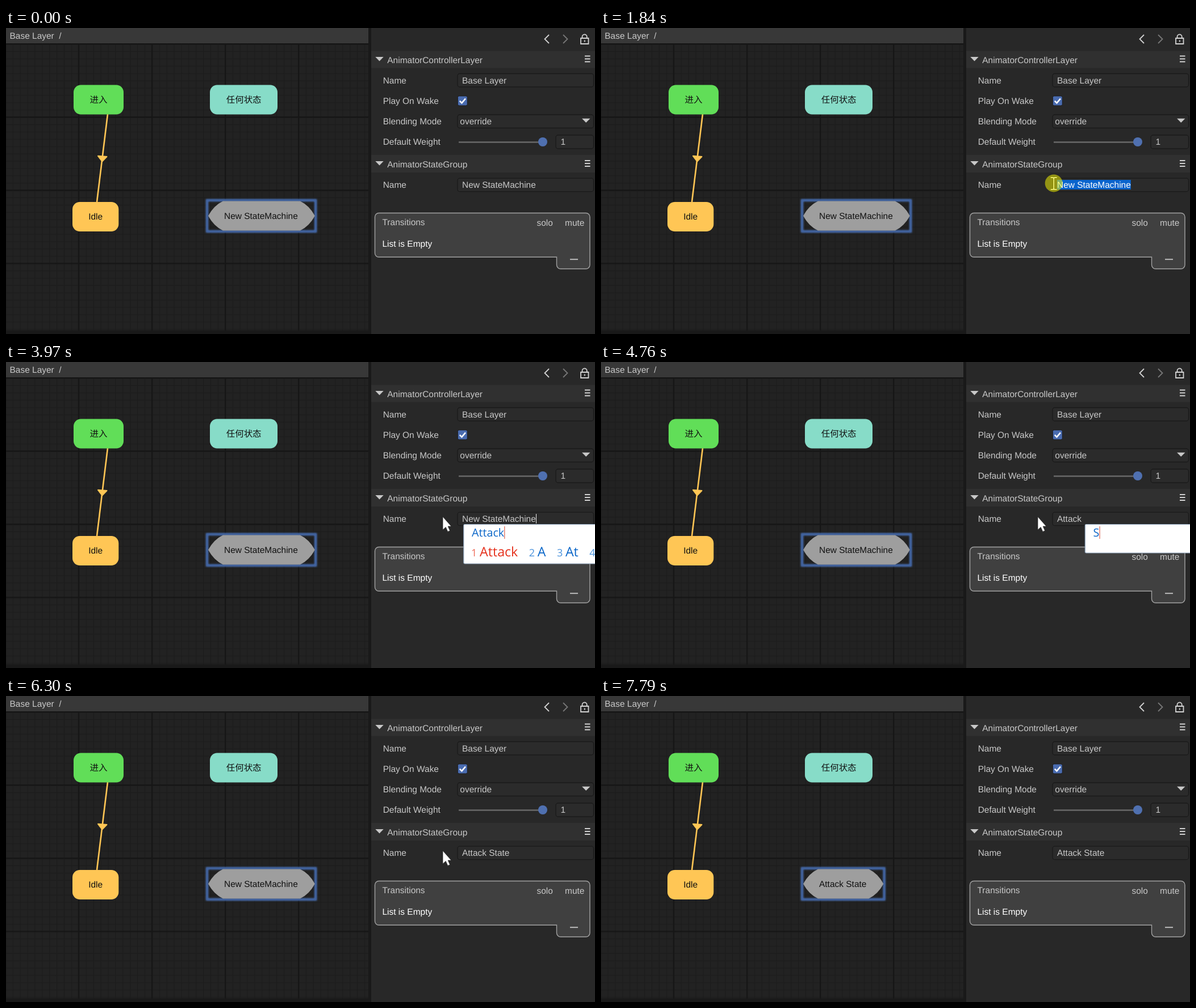
Animation, 1037 px wide and 540 px high, one loop 8930 ms. Source, as an HTML page:

```html
<!DOCTYPE html>
<html lang="en">
<head>
<meta charset="utf-8">
<title>Renaming a state group</title>
<style>
  html, body { margin: 0; width: 100%; height: 100%; overflow: hidden; background: #282828; }
  svg { display: block; width: 1037px; height: 540px; }
  text { font: 15.48px "Liberation Sans", Arial, sans-serif; fill: #c8c8c8; white-space: pre; text-rendering: geometricPrecision; }
  .dark { fill: #111; }
  .cjk { font-family: "Noto Sans CJK SC", "Noto Sans CJK", sans-serif; }
  .white { fill: #fff; }
  .box { fill: #2b2b2b; stroke: #1a1a1a; stroke-width: 1.3; }
  .icon { fill: none; stroke: #d2d2d2; stroke-width: 1.8; }
  .tri { fill: #c8c8c8; }
  #popup text { font-family: "Open Sans", "Noto Sans", sans-serif; fill: #0a66c8; }
  #typed { font-size: 19.7px; }
  #options { font-size: 23.2px; }
  #options .num { font-size: 18px; fill: #4b93dc; }
  #options .first { fill: #e5301c; }
  #options .num.first { fill: #ee6a58; }
</style>
</head>
<body>
<svg viewBox="0 0 1037 540" xmlns="http://www.w3.org/2000/svg">
  <defs>
    <pattern id="minor" x="-1.3" y="28" width="12.9" height="12.9" patternUnits="userSpaceOnUse">
      <path d="M0 .65H12.9M.65 0V12.9" stroke="#1c1c1c" stroke-width="1.3"/>
    </pattern>
    <pattern id="major" x="-2.3" y="27" width="129.1" height="129.1" patternUnits="userSpaceOnUse">
      <path d="M0 1.2H129.1M1.2 0V129.1" stroke="#161616" stroke-width="2.4"/>
    </pattern>
    <filter id="glow" x="-10%" y="-25%" width="120%" height="150%"><feGaussianBlur stdDeviation="1.6"/></filter>
    <clipPath id="selClip"><rect id="selClipBox" y="260" height="30"/></clipPath>
    <clipPath id="popClip"><rect id="popClipBox" x="1" y="287" height="49.5"/></clipPath>
    <g id="menu"><path class="icon" stroke-width="1.4" d="M1019 -5H1028.5M1019 0H1028.5M1019 5H1028.5"/></g>
    <path id="fold" class="tri" d="M650.3 -4.5H664.7L657.5 3Z"/>
  </defs>

  <!-- graph -->
  <rect width="638" height="540" fill="#222"/>
  <rect width="638" height="540" fill="url(#minor)"/>
  <rect width="638" height="540" fill="url(#major)"/>
  <rect width="638" height="27" fill="#383838"/>
  <rect y="533.5" width="643" height="6.5" fill="#191919"/>
  <rect x="638" width="5" height="540" fill="#191919"/>
  <text x="6.5" y="18.8">Base Layer  /</text>

  <path d="M179 152L160 307" stroke="#ffc655" stroke-width="2.6"/>
  <path d="M162 225.8L177.5 227L169.3 235.5Z" fill="#ffc655" stroke="#ffc655" stroke-width="2" stroke-linejoin="round"/>
  <rect x="119" y="100.5" width="88" height="52" rx="12.9" fill="#61de58"/>
  <rect x="359" y="100.5" width="119" height="52" rx="12.9" fill="#87dcc8"/>
  <rect x="117" y="307" width="81.3" height="52" rx="12.9" fill="#ffc655"/>
  <text class="dark cjk" x="147.5" y="131.5">进入</text>
  <text class="dark cjk" x="387.7" y="131.5">任何状态</text>
  <text class="dark" x="145.2" y="337.8">Idle</text>

  <rect class="frame" x="354" y="304" height="55" fill="none" stroke="#4a74c0" stroke-width="4" filter="url(#glow)"/>
  <rect class="frame" x="354" y="304" height="55" fill="none" stroke="#40619c" stroke-width="2.4"/>
  <path id="shape" fill="#9e9e9e"/>
  <text id="label" class="dark" x="384" y="336.5"></text>

  <!-- inspector -->
  <rect x="643" width="394" height="540" fill="#282828"/>
  <rect x="643" y="40.5" width="394" height="30" fill="#303030"/>
  <rect x="643" y="224" width="394" height="31" fill="#303030"/>
  <path class="icon" d="M956 12L948.5 19.5L956 27"/>
  <path class="icon" style="stroke:#777" d="M981 12L988.5 19.5L981 27"/>
  <path class="icon" stroke-width="1.6" d="M1014.5 17.5V15.5A4 4 0 0 1 1022.7 15.5V17.5M1012 18H1025.5V28H1012ZM1018.8 21.5V24.5"/>
  <use href="#fold" y="55.5"/><use href="#fold" y="239.5"/>
  <use href="#menu" y="54.5"/><use href="#menu" y="239"/>
  <text x="671.3" y="61.5">AnimatorControllerLayer</text>
  <text x="671.3" y="246">AnimatorStateGroup</text>
  <text x="663.7" y="97.6">Name</text>
  <text x="663.7" y="133.8">Play On Wake</text>
  <text x="663.7" y="170">Blending Mode</text>
  <text x="663.7" y="206.2">Default Weight</text>
  <text x="663.7" y="282.4">Name</text>

  <rect class="box" x="795" y="80.5" width="239.5" height="23.5" rx="4"/>
  <text x="803" y="97.6">Base Layer</text>
  <rect x="795.3" y="120" width="17" height="17" rx="2.5" fill="#4a6cb0" stroke="#1a1a1a"/>
  <path d="M798.8 128.7L802.4 132.4L809 124.6" fill="none" stroke="#fff" stroke-width="2.4"/>
  <rect class="box" x="795" y="153" width="239.5" height="23.5" rx="4"/>
  <text x="799.3" y="170">override</text>
  <path class="tri" d="M1014 159.8H1028.4L1021.2 167Z"/>
  <path d="M797 201.5H945" stroke="#696969" stroke-width="2.4"/>
  <circle cx="945" cy="201" r="8" fill="#4f70b0"/>
  <rect class="box" x="968" y="189" width="66.5" height="24" rx="4"/>
  <text x="976.5" y="206.2">1</text>
  <rect class="box" x="795" y="265.2" width="239.5" height="23.5" rx="4"/>

  <text id="field" x="803" y="282.4"></text>
  <rect id="selBox" y="268" height="17" fill="#0a64cd"/>
  <text id="selText" class="white" x="803" y="282.4" clip-path="url(#selClip)"></text>
  <rect id="caret" y="268" width="1" height="17" fill="#eee"/>

  <path d="M656.5 326.5H1021a7 7 0 0 1 7 7V418a7 7 0 0 1 -7 7H976.5a7 7 0 0 1 -7 -7V404.3H656.5a7 7 0 0 1 -7 -7V333.5a7 7 0 0 1 7 -7Z" fill="#404040" stroke="#a2a2a2" stroke-width="1.4"/>
  <text x="662.5" y="348.2">Transitions</text>
  <text x="934.5" y="348.8">solo</text>
  <text x="984" y="348.8">mute</text>
  <text class="white" x="662.5" y="385.5">List is Empty</text>
  <path d="M993 408.3H1007" stroke="#c8c8c8" stroke-width="1.8"/>

  <g id="popup">
    <rect id="panel" x=".5" y="286.5" rx="2" fill="#fff" stroke="#8fa5bd" stroke-width="1.2"/>
    <circle id="badge" cx="208.5" cy="304" r="19" fill="#fbdcd3" clip-path="url(#popClip)"/>
    <text id="typed" x="14.8" y="307.8"></text>
    <rect id="typedCaret" y="290" width="1.3" height="22" fill="#e0705f"/>
    <text id="options" x="13.8" y="342.6"></text>
  </g>

  <g id="cursor">
    <path id="arrow" d="M0 0V23.2L5.2 18.4L8.8 26.4L12.6 24.7L9.2 17H15Z" fill="#fff" stroke="#222" stroke-width=".7"/>
    <g id="beam" fill="none">
      <path id="beamLine" d="M-5.5 -10H-2Q0 -10 0 -8Q0 -10 2 -10H5.5M0 -8V9M-5.5 11H-2Q0 11 0 9Q0 11 2 11H5.5" stroke="#111" stroke-width="3.4"/>
      <use href="#beamLine"/>
      <path d="M-5.5 -10H-2Q0 -10 0 -8Q0 -10 2 -10H5.5M0 -8V9M-5.5 11H-2Q0 11 0 9Q0 11 2 11H5.5" stroke="#eee" stroke-width="1.7"/>
    </g>
    <circle id="press" r="15.5" fill="#ff0" fill-opacity=".5"/>
  </g>
</svg>
<script>
const LOOP = 8930, TEXT_X = 803;
const OLD = "New StateMachine", NEW = "Attack State";
const $ = id => document.getElementById(id);
const show = (el, on) => el.setAttribute("visibility", on ? "inherit" : "hidden");
const set = (el, attrs) => { for (const k in attrs) el.setAttribute(k, attrs[k]); };
const within = (t, spans) => spans.some(([a, b]) => t >= a && t < b);
const latest = (t, rows) => rows.filter(r => r[0] <= t).pop();

// Pointer paths: evenly timed points, sampled in whole steps
const easeOut = p => 1 - (1 - p) ** 2;
const paths = [
  { from: 200, to: 960, steps: 11, ease: easeOut, pts: [[628, 504], [955, 284]] },
  { from: 1160, to: 1910, steps: 11, pts: [[955, 284], [955, 284], [967, 282], [890, 279], [800, 274], [769, 273]] },
  { from: 6630, to: 7040, steps: 6, pts: [[767, 283], [747, 479]] },
  { from: 7170, to: 7171, steps: 1, pts: [[747, 477], [747, 477]] },
  { from: 7370, to: 7720, steps: 5, pts: [[749, 477], [761, 474], [690, 442], [600, 403], [527, 376]] }
];
const presses = [[1430, 2110], [7040, 7170]];
const carets = [[1160, 1500], [2910, 3450], [3840, 4760], [5090, 6300], [6830, 7040]];

const fieldRows = [[0, OLD], [4040, "Attack"], [4230, "Attack "], [5750, NEW]];

// time, left edge, typed text, candidates
const popupRows = [
  [0],
  [2510, 805.3, "A"],
  [2910, 805.3, "At"],
  [3040, 805.3, "At", ["At", "A", "Art"]],
  [3320, 805.3, "Att", ["Att", "A", "At"]],
  [3580, 805.3, "Atta", ["Atta", "A", "At"]],
  [3840, 805.3, "Attac", ["Attac", "A", "At"]],
  [3970, 805.3, "Attack", ["Attack", "A", "At", "Att"]],
  [4040],
  [4760, 851.8, "S"],
  [5090, 851.8, "St", ["St", "S", "Set"]],
  [5220, 851.8, "Sta", ["Sta", "S", "St"]],
  [5350, 851.8, "Stat", ["Stat", "S", "St"]],
  [5420, 851.8, "State", ["State", "S", "St"]],
  [5750]
];

function pointerAt(t) {
  const path = paths.filter(p => p.from <= t).pop();
  if (!path || t >= 7790) return null;
  const raw = Math.min(1, (t - path.from) / (path.to - path.from));
  const stepped = Math.floor(raw * path.steps + 0.001) / path.steps;
  const pos = (path.ease || (p => p))(stepped) * (path.pts.length - 1);
  const i = Math.min(Math.floor(pos), path.pts.length - 2), f = pos - i;
  return path.pts[i].map((v, axis) => v + (path.pts[i + 1][axis] - v) * f);
}

function drawPointer(t, at) {
  show($("cursor"), at);
  if (!at) return;
  const [x, y] = at;
  const overField = x > 795 && y > 265 && y < 289;
  $("cursor").setAttribute("transform", `translate(${x} ${y})`);
  show($("arrow"), !overField);
  show($("beam"), overField);
  show($("press"), within(t, presses));
}

function drawField(t, at) {
  const text = latest(t, fieldRows)[1], field = $("field");
  field.textContent = text;
  const end = TEXT_X + field.getComputedTextLength();

  // Selection snaps to the letter edge nearest the pointer
  let start = end;
  if (t >= 1430 && t < 2910) {
    for (let i = text.length - 1; i >= 0; i--) {
      const left = TEXT_X + (i ? field.getSubStringLength(0, i) : 0);
      if (at[0] < (left + start) / 2) start = left; else break;
    }
  }
  const selected = start < end;
  for (const el of [$("selBox"), $("selClipBox")]) set(el, { x: start, width: end - start });
  $("selText").textContent = text;
  show($("selBox"), selected);
  show($("selText"), selected);
  $("caret").setAttribute("x", Math.floor(end + 0.3));
  show($("caret"), !selected && within(t, carets));
}

function drawNode(name) {
  $("label").textContent = name;
  const r = 414 + $("label").getComputedTextLength();
  document.querySelectorAll(".frame").forEach(el => el.setAttribute("width", r + 1.3 - 354));
  $("shape").setAttribute("d",
    `M356 331.5Q366 313 382 305.5H${r - 26}Q${r - 10} 313 ${r} 331.5Q${r - 10} 350 ${r - 26} 357.5H382Q366 350 356 331.5Z`);
}

function drawPopup(t) {
  const [, left, typed, options] = latest(t, popupRows);
  show($("popup"), typed);
  if (!typed) return;
  $("popup").setAttribute("transform", `translate(${left} 0)`);
  set($("panel"), { width: options ? 400 : 228.3, height: options ? 69.5 : 50.5 });
  $("popClipBox").setAttribute("width", 227);
  show($("badge"), !options);
  $("typed").textContent = typed;
  $("typedCaret").setAttribute("x", 14.8 + $("typed").getComputedTextLength());
  $("options").innerHTML = (options || []).concat(options && options.length < 4 ? "Sat" : [])
    .map((word, i) => {
      const first = i ? "" : " first";
      return `<tspan class="num${first}" dx="${i ? 19.5 : 0}">${i + 1}</tspan><tspan class="${first}" dx="4.7">${word}</tspan>`;
    }).join("");
}

const begin = performance.now();
function frame() {
  const t = (performance.now() - begin) % LOOP;
  const at = pointerAt(t);
  drawField(t, at);
  drawNode(t < 7040 ? OLD : NEW);
  drawPopup(t);
  drawPointer(t, at);
  requestAnimationFrame(frame);
}
frame();
</script>
</body>
</html>
```
